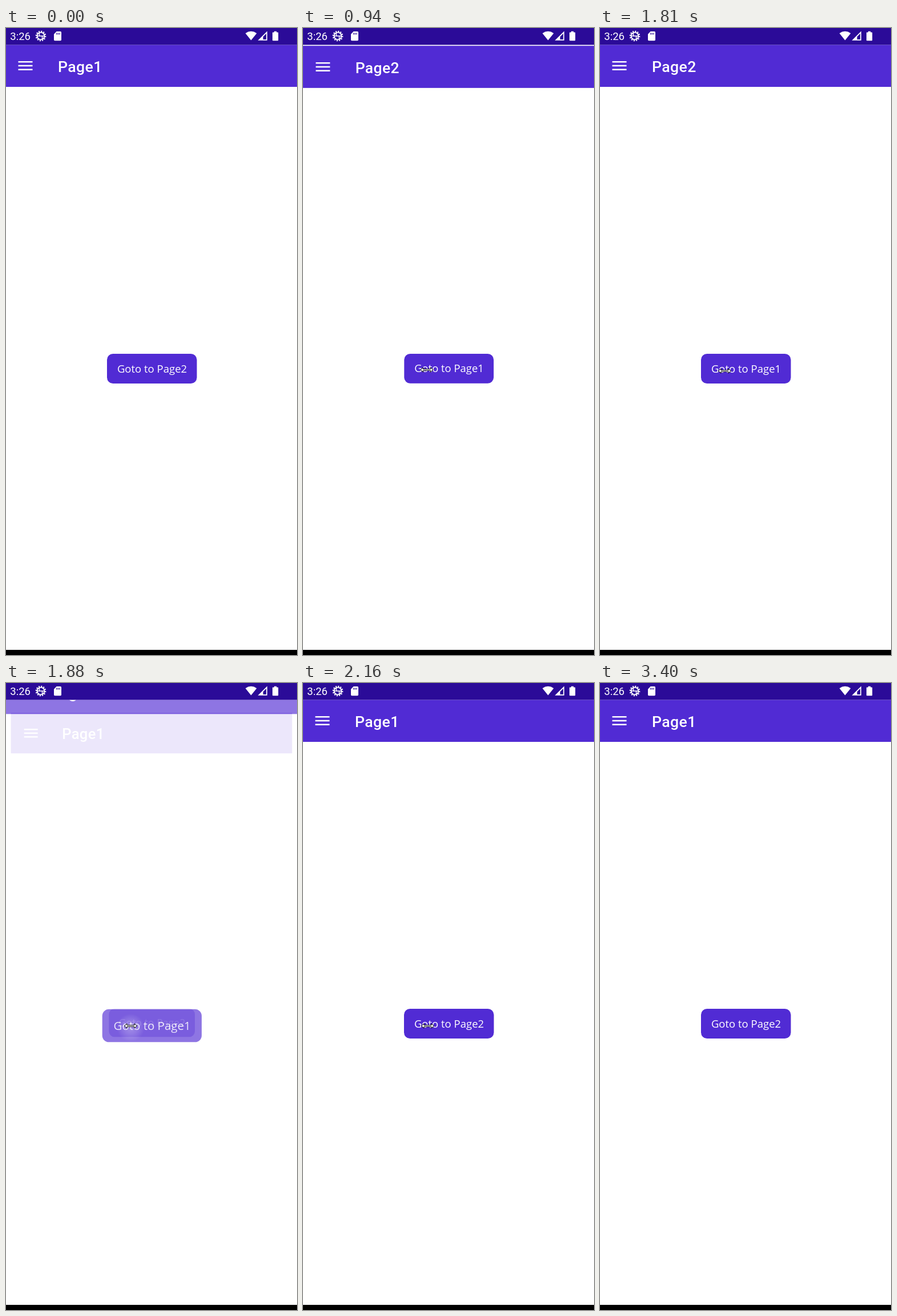
Animation, 510 px wide and 1097 px high, one loop 3.98 s. Source, as an HTML page:

```html
<!DOCTYPE html>
<html lang="en">
<head>
<meta charset="utf-8">
<title>Page navigation</title>
<style>
  html, body { margin: 0; width: 100%; height: 100%; overflow: hidden; background: #fff; }
  svg { display: block; width: 100vw; height: 100vh; }
  .title { font: 500 26.6px Roboto, sans-serif; letter-spacing: .4px; }
  .label { font: 400 18.5px "Open Sans", sans-serif; text-anchor: middle; }
  .clock { font: 400 18.5px Roboto, sans-serif; }
</style>
</head>
<body>
<svg viewBox="0 0 510 1097" preserveAspectRatio="none">
  <defs>
    <clipPath id="screen"><rect y="29.5" width="510" height="1058.5"/></clipPath>
    <radialGradient id="glow">
      <stop offset="0" stop-color="#fff" stop-opacity=".36"/>
      <stop offset=".5" stop-color="#fff" stop-opacity=".2"/>
      <stop offset="1" stop-color="#fff" stop-opacity="0"/>
    </radialGradient>
  </defs>
  <rect width="510" height="1097" fill="#fff"/>
  <g clip-path="url(#screen)" id="pages"></g>
  <rect y="1088" width="510" height="9"/>

  <rect width="510" height="29.5" fill="#2b0b98"/>
  <g fill="#fff">
    <text class="clock" x="7.3" y="21">3:26</text>
    <g transform="translate(61 14)" fill="none" stroke="#fff">
      <circle r="6.4" stroke-width="1.9"/>
      <circle r="8.3" stroke-width="2" stroke-dasharray="2.17 2.17"/>
      <path d="M-6 0H6M-2.5 0V-5M2.5 0V5" stroke-width="1.5"/>
    </g>
    <path d="M88.6 6H95.4Q97 6 97 7.6V20.6Q97 22.2 95.4 22.2H85.6Q84 22.2 84 20.6V10.8Z"/>
    <path d="M88.8 8.4V11.4M91.4 8.4V11.4M94 8.4V11.4" stroke="#2b0b98" stroke-width="1.3"/>
    <path d="M429.5 21.6L419.6 9.2Q429.5 2.4 439.4 9.2Z"/>
    <path d="M441.4 21.8L457.8 5.6V21.8ZM450.6 20.1H456.1V9.8L450.6 15.2Z" fill-rule="evenodd"/>
    <path d="M470 5.8H474.2V7.4H476.2Q477.2 7.4 477.2 8.4V21.2Q477.2 22.2 476.2 22.2H468Q467 22.2 467 21.2V8.4Q467 7.4 468 7.4H470Z"/>
  </g>

  <g id="cursor">
    <path d="M-11 0L-6.5 -4V-1.2H6.5V-4L11 0L6.5 4V1.2H-6.5V4Z" fill="#fff" stroke="#000"/>
    <circle id="tap" r="12" fill="#e6dc10" fill-opacity=".6"/>
  </g>
</svg>
<script>
const LOOP = 3980, TICK = 67.4, SLIDE = 300, FADE = 83;
const $ = id => document.getElementById(id);
const clamp = v => Math.min(1, Math.max(0, v));
const mix = (a, b, u) => a + (b - a) * u;

const pageMarkup = n => `<g id="page${n}">
  <rect x="-3" y="29" width="516" height="1068" fill="#fff"/>
  <rect x="-2.7" y="29" width="515.4" height="74" fill="#512bd4"/>
  <path d="M21.5 59.2H46.5M21.5 66H46.5M21.5 72.8H46.5" stroke="#fff" stroke-width="2.6"/>
  <text class="title" x="91" y="77" fill="#fff">Page${n}</text>
  <rect x="177" y="570" width="157.5" height="52" rx="10.5" fill="#512bd4"/>
  <text class="label" x="256" y="602.6" fill="#fff">Goto to Page${3 - n}</text>
  <circle id="glow${n}" cx="222" cy="599" r="22" fill="url(#glow)"/>
</g>`;
$("pages").innerHTML = pageMarkup(1) + pageMarkup(2);

const cubic = (a, b, c, d, u) => {
  const v = 1 - u;
  return a * v * v * v + 3 * b * u * v * v + 3 * c * u * u * v + d * u * u * u;
};

// Two joined curves: quick start, very long settling
function ease(x) {
  if (x <= 0) return 0;
  if (x >= 1) return 1;
  const k = 1 / 6;
  const [xs, ys] = x < k
    ? [[0, .05, .1333, k], [0, 0, .06, .4]]
    : [[k, .2083, .25, 1], [.4, .82, 1, 1]];
  let lo = 0, hi = 1;
  for (let i = 0; i < 24; i++) {
    const mid = (lo + hi) / 2;
    if (cubic(...xs, mid) < x) lo = mid; else hi = mid;
  }
  return cubic(...ys, lo);
}

function placePage(n, scale, alpha, glow) {
  const page = $("page" + n);
  page.setAttribute("transform", `translate(255 562) scale(${scale}) translate(-255 -562)`);
  page.setAttribute("opacity", alpha);
  $("glow" + n).setAttribute("opacity", glow);
}

function navigate(from, to, ms) {
  const p = ease(ms / SLIDE);
  placePage(to, mix(.85, 1, p), clamp((ms - 40) / FADE), 0);
  placePage(from, mix(1, 1.15, p), 1 - clamp((ms - 37) / FADE), clamp(ms / 60));
  const top = $("page" + from);
  if (top.nextSibling) top.parentNode.append(top);
}

const bend = (a, c, b, u) => mix(mix(a, c, u), mix(c, b, u), u);

function cursorAt(k) {
  if (k >= 1 && k < 25) {
    const s = clamp((k - 1) / 5), u = 1 - (1 - s) ** 2;
    return [bend(384, 266, 217, u), bend(1080, 955, 598, u)];
  }
  if (k >= 25 && k <= 41) {
    const u = clamp((k - 37) / 4) ** 1.5;
    return [bend(218.5, 340, 493, u), bend(600, 740, 959, u)];
  }
  if (k >= 45 && k < 50) {
    const u = (k - 45) / 4;
    return [mix(500, 475, u), mix(1082, 1092, u)];
  }
  return null;
}

function draw(t) {
  const k = Math.floor((t + 10) / TICK), q = k * TICK;
  if (q < 1400) navigate(1, 2, q - 764);
  else navigate(2, 1, q - 1821);

  const spot = cursorAt(k);
  $("cursor").setAttribute("visibility", spot ? "visible" : "hidden");
  if (spot) $("cursor").setAttribute("transform", `translate(${spot})`);
  const pressed = k === 10 || k === 11 || k === 25 || k === 26;
  $("tap").setAttribute("opacity", pressed ? 1 : 0);
}

const start = performance.now();
function frame() {
  draw((performance.now() - start) % LOOP);
  requestAnimationFrame(frame);
}
frame();
</script>
</body>
</html>
```
